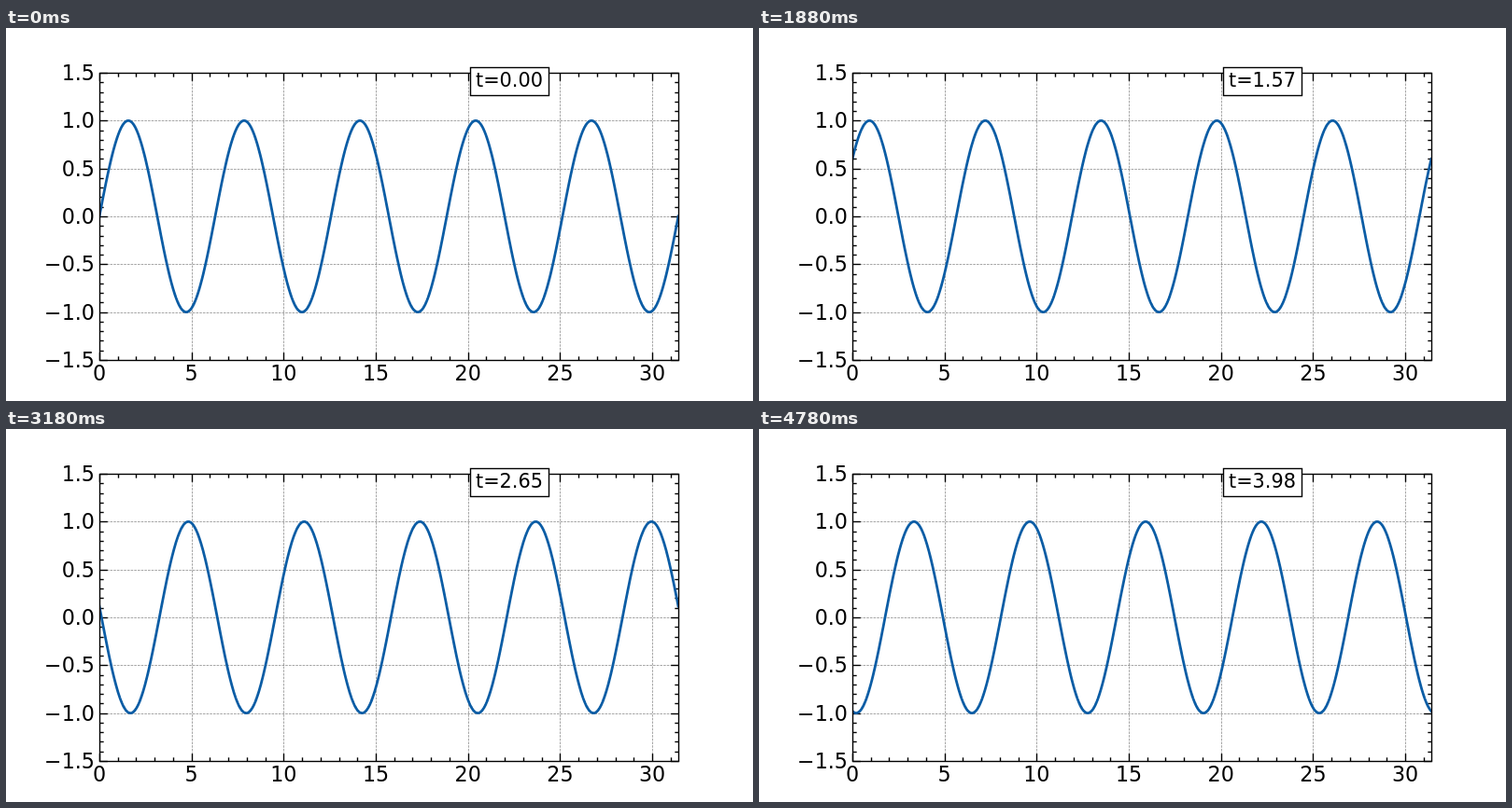
These frames come from a looping animation (800 px wide and 400 px high, 4800 ms). An HTML page with a canvas:

```html
<!DOCTYPE html>
<html lang="en">
<head>
<meta charset="utf-8">
<title>Travelling sine wave</title>
<style>
  html, body { margin: 0; width: 100%; height: 100%; overflow: hidden; background: #fff; }
  canvas { display: block; }
</style>
</head>
<body>
<canvas id="plot" width="800" height="400"></canvas>
<script>
const ctx = document.getElementById('plot').getContext('2d');
const PT = 100 / 72;
const LEFT = 100, RIGHT = 720, TOP = 48, BOTTOM = 356;
const X_MAX = 10 * Math.PI;
const OMEGA = 3.6;
const STEP_MS = 20, STEPS = 240, STEPS_PER_UNIT = 60;
const FONT = '"DejaVu Sans", sans-serif';

const toX = x => LEFT + (RIGHT - LEFT) * x / X_MAX;
const toY = y => (TOP + BOTTOM) / 2 - y * (BOTTOM - TOP) / 3;
const snap = v => Math.floor(v + 0.5) + 0.5;

function line(x1, y1, x2, y2) {
  ctx.beginPath();
  ctx.moveTo(x1, y1);
  ctx.lineTo(x2, y2);
  ctx.stroke();
}

function text(str, x, y, size, align) {
  ctx.font = `${size * PT}px ${FONT}`;
  ctx.textAlign = align;
  ctx.fillStyle = '#000';
  ctx.fillText(str, x, y);
}

function xTick(value, length) {
  const x = snap(toX(value));
  line(x, BOTTOM + 0.5, x, BOTTOM + 0.5 - length);
  line(x, TOP + 0.5, x, TOP + 0.5 + length);
}

function yTick(value, length) {
  const y = snap(toY(value));
  line(LEFT + 0.5, y, LEFT + 0.5 + length, y);
  line(RIGHT + 0.5, y, RIGHT + 0.5 - length, y);
}

function drawGrid() {
  ctx.save();
  ctx.strokeStyle = 'rgba(0, 0, 0, 0.5)';
  ctx.lineWidth = 0.5 * PT;
  ctx.setLineDash([1.85 * PT, 0.8 * PT]);
  for (let v = 0; v <= 30; v += 5) line(snap(toX(v)), BOTTOM + 0.5, snap(toX(v)), TOP + 0.5);
  for (let i = -3; i <= 3; i++) line(LEFT + 0.5, snap(toY(i / 2)), RIGHT + 0.5, snap(toY(i / 2)));
  ctx.restore();
}

function drawTicks() {
  ctx.strokeStyle = '#000';
  ctx.lineWidth = PT;
  for (let v = 0; v <= 31; v++) {
    const major = v % 5 === 0;
    xTick(v, (major ? 6 : 3) * PT);
    if (major) text(String(v), toX(v), 378, 16, 'center');
  }
  for (let i = -15; i <= 15; i++) {
    const major = i % 5 === 0;
    yTick(i / 10, (major ? 6 : 3) * PT);
    if (major) {
      const label = (i / 10).toFixed(1).replace('-', '\u2212');
      text(label, 95, Math.round(toY(i / 10) + 8), 16, 'right');
    }
  }
}

function drawWave(t) {
  ctx.save();
  ctx.beginPath();
  ctx.rect(LEFT, TOP, RIGHT - LEFT, BOTTOM - TOP);
  ctx.clip();
  ctx.beginPath();
  for (let px = LEFT; px <= RIGHT; px++) {
    const x = (px - LEFT) / (RIGHT - LEFT) * X_MAX;
    ctx.lineTo(px, toY(Math.sin(x - OMEGA * t)));
  }
  ctx.strokeStyle = '#0C5DA5';
  ctx.lineWidth = 2 * PT;
  ctx.lineJoin = 'round';
  ctx.lineCap = 'square';
  ctx.stroke();
  ctx.restore();
}

function drawFrame() {
  ctx.strokeStyle = '#000';
  ctx.lineWidth = PT;
  ctx.strokeRect(LEFT + 0.5, TOP + 0.5, RIGHT - LEFT, BOTTOM - TOP);
}

function drawClock(t) {
  ctx.fillStyle = '#fff';
  ctx.fillRect(497.5, 42.5, 84, 30);
  ctx.strokeRect(497.5, 42.5, 84, 30);
  text(`t=${t.toFixed(2)}`, 503, 63, 15, 'left');
}

function render(now) {
  const step = Math.floor(now / STEP_MS + 1e-4) % STEPS;
  const t = step / STEPS_PER_UNIT;
  ctx.fillStyle = '#fff';
  ctx.fillRect(0, 0, 800, 400);
  drawGrid();
  drawTicks();
  drawWave(t);
  drawFrame();
  drawClock(t);
  requestAnimationFrame(render);
}

render(0);
</script>
</body>
</html>
```
